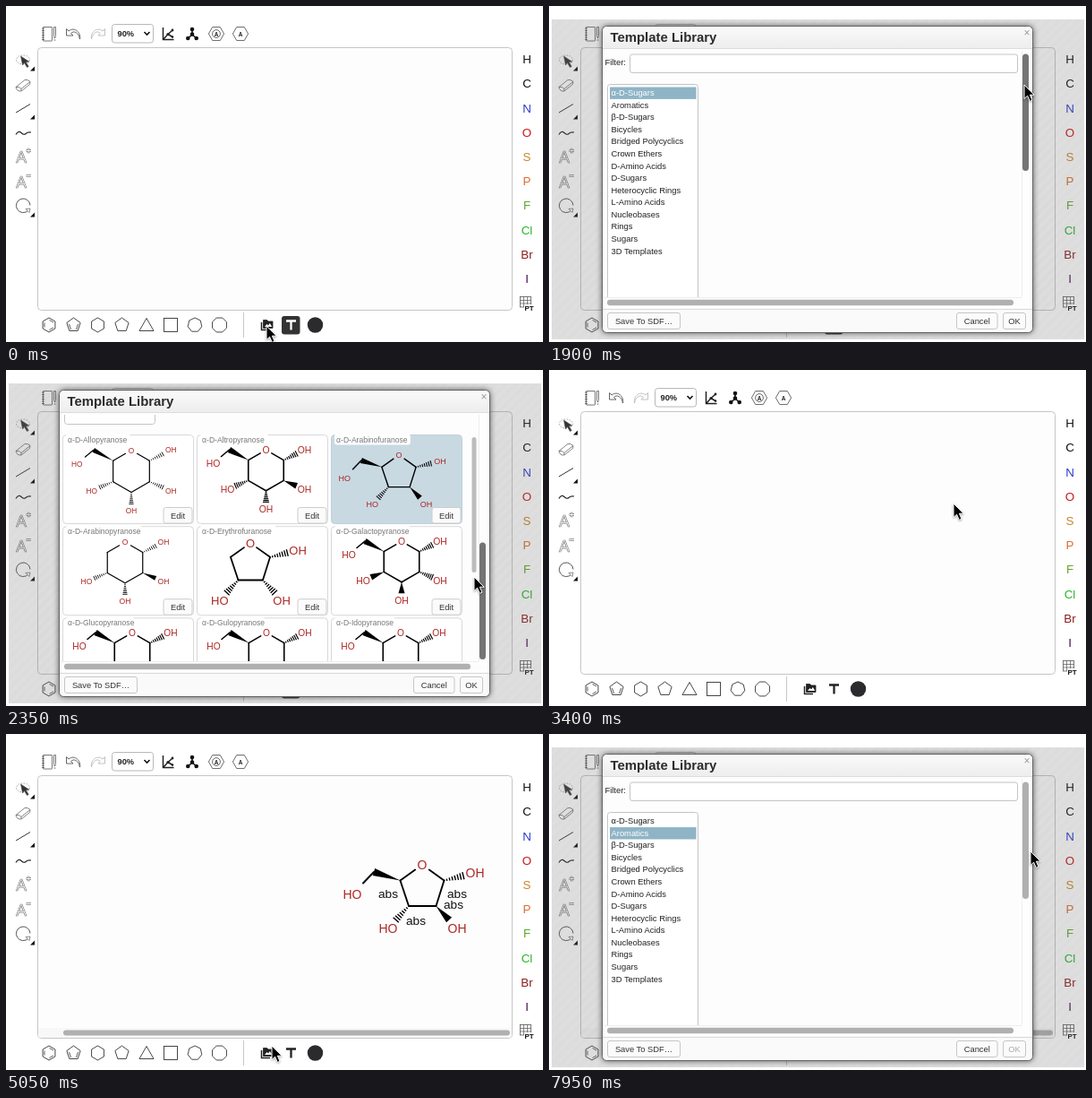
An HTML page that plays this animation: 600x375 px, repeating every 8000 ms.

```html
<!DOCTYPE html>
<html lang="en">
<head>
<meta charset="utf-8">
<title>Template library</title>
<style>
html, body { margin: 0; width: 100%; height: 100%; overflow: hidden; background: #fff; }
svg { display: block; width: 100vw; height: 100vh; font-family: "Liberation Sans", Arial, sans-serif; }
</style>
</head>
<body>
<svg id="stage" viewBox="0 0 600 375"></svg>
<script>
const LOOP = 8000;
const RED = '#ad2824', BAR = '#b0b0b0';

// --- small SVG helpers -------------------------------------------------
const text = (x, y, s, size, fill = '#333', more = '') =>
  `<text x="${x}" y="${y}" font-size="${size}" fill="${fill}" ${more}>${s}</text>`;
const mid = (x, y, s, size, fill, more = '') => text(x, y, s, size, fill, 'text-anchor="middle" ' + more);
const box = (x, y, w, h, r, fill, stroke = 'none', more = '') =>
  `<rect x="${x}" y="${y}" width="${w}" height="${h}" rx="${r}" fill="${fill}" stroke="${stroke}" ${more}/>`;
const path = (d, stroke = '#333', w = 1, fill = 'none', more = '') =>
  `<path d="${d}" fill="${fill}" stroke="${stroke}" stroke-width="${w}" ${more}/>`;
const dot = (x, y, r, fill) => `<circle cx="${x}" cy="${y}" r="${r}" fill="${fill}"/>`;
const toPath = pts => 'M' + pts.map(p => p.map(v => v.toFixed(2)).join(' ')).join('L') + 'Z';

function poly(cx, cy, r, n, turn = 0) {
  return Array.from({ length: n }, (_, i) => {
    const a = (i / n) * 2 * Math.PI - Math.PI / 2 + turn;
    return [cx + r * Math.cos(a), cy + r * Math.sin(a)];
  });
}
const lerp = (a, b, k) => [a[0] + (b[0] - a[0]) * k, a[1] + (b[1] - a[1]) * k];
function normal(a, b) {
  const dx = b[0] - a[0], dy = b[1] - a[1], l = Math.hypot(dx, dy);
  return [-dy / l, dx / l];
}
const offset = (p, n, k) => [p[0] + n[0] * k, p[1] + n[1] * k];
const line = (a, b, w, stroke = '#000') => path(`M${a}L${b}`, stroke, w, 'none', 'stroke-linecap="round"');

// --- molecules ---------------------------------------------------------
function wedge(a, b, w) {
  const n = normal(a, b);
  return path(toPath([a, offset(b, n, w), offset(b, n, -w)]), 'none', 0, '#000');
}
function hash(a, b, w, lw) {
  const n = normal(a, b);
  let out = '';
  for (let i = 1; i <= 7; i++) {
    const p = lerp(a, b, i / 7), k = w * (0.15 + 0.85 * i / 7);
    out += path(`M${offset(p, n, k)}L${offset(p, n, -k)}`, '#000', lw * 0.75);
  }
  return out;
}
const FIVE = {
  ring: [[0, -26], [24.5, -8.5], [15.5, 20], [-15, 20], [-24.5, -8.5]],
  subs: [[59, -17], [39, 45], [-38, 45]], arm: [-54, -18], end: [-78, 7]
};
const SIX = {
  ring: poly(0, 0, 22.8, 6),
  subs: [[43, -23], [43, 21], [0, 43], [-43, 21]], arm: [-41, -23], end: [-59, -8]
};
// bonds: one letter per hydroxyl (h hashed, w wedge), then c when there is a CH2OH arm
function sugar(shape, cx, cy, s, size, lw, bonds) {
  const at = p => [cx + p[0] * s, cy + p[1] * s];
  const ring = shape.ring.map(at), n = ring.length, wide = 2.2 * lw;
  const label = (p, str) => mid(p[0], p[1] + size * 0.36, str, size, RED);
  let out = '';
  ring.forEach((p, i) => {
    const q = ring[(i + 1) % n];
    out += line(i ? p : lerp(p, q, 0.32), i === n - 1 ? lerp(p, q, 0.68) : q, lw);
  });
  shape.subs.forEach((sub, i) => {
    const from = ring[i + 1], to = at(sub), end = lerp(from, to, 0.62);
    out += bonds[i] === 'w' ? wedge(from, end, wide) : hash(from, end, wide, lw);
    out += label(to, sub[0] < 0 ? 'HO' : 'OH');
  });
  if (bonds.endsWith('c')) {
    const arm = at(shape.arm), end = at(shape.end);
    out += wedge(ring[n - 1], arm, wide) + line(arm, lerp(arm, end, 0.5), lw) + label(end, 'HO');
  }
  return out + label(ring[0], 'O');
}

// --- editor ------------------------------------------------------------
function hexA(x, circled) {
  return path(toPath(poly(x, 31, 8.6, 6, Math.PI / 6)), '#444', 0.8) +
    (circled ? `<circle cx="${x}" cy="31" r="4.4" fill="none" stroke="#444" stroke-width=".8"/>` : '') +
    mid(x, 33.6, 'A', 6.5, '#222', 'font-weight="bold"');
}
function topBar() {
  let s = box(41.5, 23.5, 10, 15.5, 0.5, 'none', '#555', 'stroke-width=".8"');
  for (let y = 25; y < 39; y += 2.5) s += path(`M40 ${y}h3`, '#555', 0.8);
  s += path('M53.5 23.5h2v10l-1 2.5l-1-2.5zM53.5 38h2', '#555', 0.8);
  const undo = 'M67.5 25.5L67.5 33L75 33L72.5 30.5C76 27 81 29.5 82.5 37C84 30 77 22.5 70 28Z';
  s += path(undo, '#555', 0.9) + path(undo, '#bbb', 0.9, 'none', 'transform="translate(178,0) scale(-1,1)"');
  s += box(118.5, 20.5, 46, 20.5, 3, '#fff', '#b8b8b8') + text(124.5, 34, '90%', 9.3, '#222', 'font-weight="bold"') +
    path('M154.5 29l3 3l3-3', '#111', 1.6);
  s += path('M175.5 24v13.5h12M175.5 37.5l5.5-6l4.5-4M181 31.5l5 3', '#222', 1.5) +
    dot(181, 31.5, 1.6, '#222') + dot(186, 27, 1.4, '#222') + dot(186, 34.5, 1.3, '#222');
  s += path('M208 25.5V32L203 36M208 32L213 36', '#111', 1.6) +
    [[208, 26], [208, 31.5], [203.3, 36], [212.7, 36]].map(p => dot(...p, 2.3, '#111')).join('');
  return s + hexA(235, true) + hexA(262, false);
}
function leftBar() {
  const corner = y => path(`M32 ${y}v5h-5z`, 'none', 0, '#111');
  const bigA = (y, sign) => {
    const d = `M22.5 ${y - 6.5}h5.5` + (sign ? 'm-2.75-2.75v5.5' : '');
    return mid(17, y + 6.5, 'A', 17.5, 'none', 'stroke="#777" stroke-width=".7"') + path(d, '#777', 2.4) + path(d, '#fff', 0.9);
  };
  return `<ellipse cx="19" cy="60" rx="7.5" ry="5" fill="none" stroke="#888" stroke-width=".8" stroke-dasharray="1.5 1.5"/>` +
    path('M16.5 56l2 10l2-2.5l3 5l1.8-1l-2.9-4.8l3.4-.6z', '#555', 0.6, '#333') +
    path('M11 90.5L21 82.5Q24 81.5 27 84.5L26.5 87.5L17 95Q12 95.5 11 90.5ZM11 90.5Q15 89.5 17 92.5V95M17 92.5L27 84.5', '#666', 0.8) +
    path('M11 119L27 109.5', '#333', 1) +
    path('M11 143.5Q14 138.5 17 141.5T22 142.5T28 141', '#222', 1.1) +
    bigA(168, true) + bigA(196, false) +
    path('M25 228A7.8 7.8 0 1 1 27 222.5', '#444', 0.9) + path('M22 226.5l5-.5l-1 4.5z', '#444', 0.6, '#fff') +
    corner(67.5) + corner(121.5) + corner(230.5);
}
function rightBar() {
  const atoms = ['H #111', 'C #111', 'N #2a3ccf', 'O #c81818', 'S #c8862a', 'P #dd6d2c', 'F #62a82c', 'Cl #28b428', 'Br #8c1c1c', 'I #471050'];
  let s = atoms.map((a, i) => {
    const [name, fill] = a.split(' ');
    return mid(582, 64.2 + i * 27.2, name, 13.4, fill);
  }).join('');
  s += box(574.5, 324.5, 12, 11.5, 0, 'none', '#555', 'stroke-width=".8"') +
    path('M574.5 328.5h12M574.5 332h12M578.5 324.5v11.5M582.5 324.5v11.5', '#555', 0.7);
  return s + box(579, 333, 11, 8, 0, '#fff') + text(579.5, 339.8, 'PT', 8, '#111', 'font-weight="bold"');
}
function bottomBar() {
  const ring = (x, n, turn = 0, r = 8) => path(toPath(poly(x, 356, r, n, turn)), '#333', 0.9);
  const letterT = fill => path('M313 351.5h11M318.5 351v10.5', fill, 2.3);
  const s = ring(48, 6) + path('M43 353.5v5M48.5 350.5l4.5 2.6M48.5 361.5l4.5-2.6', '#333', 0.8) +
    ring(75.5, 5) + path('M70.5 355l2 6M80.5 355l-2 6', '#333', 0.8) +
    ring(102.5, 6) + ring(129.5, 5) +
    path('M157 348.5l8 14h-16z', '#333', 0.9) + box(176.5, 348.5, 15, 15, 0, 'none', '#333', 'stroke-width=".9"') +
    ring(211, 7) + ring(238.5, 8, Math.PI / 8, 8.6) + path('M265.5 342v28', '#c8c8c8', 1) +
    path('M285.5 353v8.5h9.5', '#222', 1.5) + path('M287.5 350.5h4l1.5 1.5h5v7.5h-10.5z', '#222', 0.8, '#222') +
    path('M289 358l2.5-3l1.5 1.5l1.8-2.5l2.4 4z', 'none', 0, '#fff');
  return s + `<g id="tPlain">${letterT('#222')}</g>` +
    `<g id="tHover">${box(308, 346, 20.5, 20.5, 3, '#333')}${letterT('#fff')}</g>` + dot(345.5, 356, 8.7, '#2b2b2e');
}
function sketch() {
  const abs = [[427, 182.5], [504, 182.5], [500, 195], [458, 213]].map(p => mid(...p, 'abs', 13.7, '#111')).join('');
  return `<g id="mol">${sugar(FIVE, 465, 172, 1, 14, 1.9, 'hwhc')}</g><g id="placed">${abs}` +
    box(36, 328, 529, 11, 3, '#f8f8f8') + box(64, 330.5, 499, 6, 3, BAR) + '</g>';
}

// --- dialog ------------------------------------------------------------
const GROUPS = ['α-D-Sugars', 'Aromatics', 'β-D-Sugars', 'Bicycles', 'Bridged Polycyclics', 'Crown Ethers', 'D-Amino Acids',
  'D-Sugars', 'Heterocyclic Rings', 'L-Amino Acids', 'Nucleobases', 'Rings', 'Sugars', '3D Templates'];
const ROW = 13.58, LIST_TOP = 90.5, SCROLL_MAX = 291, THUMB_MAX = 139;

function card(i, name, drawing) {
  const x = 63.5 + (i % 3) * 150, y = 72.5 + Math.floor(i / 3) * 102.2, picked = i === 2;
  return box(x, y, 146, 99, 4, picked ? '#c8d9e2' : '#fff', picked ? '#c0d0d9' : '#d8d8d8') +
    box(x + 3.5, y - 1, (name.length + 4) * 4.2 + 5, 12, 3, '#fff') +
    text(x + 5.6, y + 8, 'α-D-' + name, 8.55, '#777') + drawing +
    box(x + 112.5, y + 81, 32, 17.5, 2.5, '#fbfbfb', '#ccc') + mid(x + 128.5, y + 93.3, 'Edit', 9.35);
}
function cards() {
  const six = (x, y, size, bonds, lw = 1.6) => sugar(SIX, x, y, 1, size, lw, bonds);
  const items = [
    ['Allopyranose', sugar(SIX, 140, 113, 1.03, 8.3, 1.2, 'hhhhc')],
    ['Altropyranose', six(290.5, 112, 10.4, 'hwhhc')],
    ['Arabinofuranose', sugar(FIVE, 439, 115, 0.78, 9, 1.45, 'hwhc')],
    ['Arabinopyranose', six(133, 215, 8.6, 'hwhh', 1.2)],
    ['Erythrofuranose', sugar(FIVE, 273, 216.5, 0.9, 13, 1.8, 'hhh')],
    ['Galactopyranose', six(442, 214, 10.4, 'hhwwc')],
    ['Glucopyranose', six(141, 316, 10.2, 'hhwhc')],
    ['Gulopyranose', six(291, 316, 10.2, 'hhhwc')],
    ['Idopyranose', six(441, 316, 10.2, 'hwhhc')]
  ];
  return items.map(([name, d], i) => card(i, name, d)).join('');
}
function dialog() {
  const button = (x, w, label, id = '') => box(x, 342.5, w, 18, 2.5, '#fbfbfb', '#c6c6c6') +
    mid(x + w / 2, 355, label, 9.35, '#333', id);
  const list = box(65.5, 87.5, 101, 264, 3, '#fff', '#c4c4c4') +
    box(68, 0, 96.5, 13.4, 0, '#eeeeee', 'none', 'id="hover"') + box(68, 0, 96.5, 13.4, 0, '#8fb4c6', 'none', 'id="picked"') +
    GROUPS.map((g, i) => text(69.5, (LIST_TOP + 9.6 + i * ROW).toFixed(2), g, 9.4, '#222', 'class="group"')).join('');
  return `<g style="filter:drop-shadow(0 0 3px rgba(0,0,0,.6))">${box(59.5, 22.5, 481, 342, 5, '#fafafa', '#666')}</g>` +
    box(60.5, 23.5, 479, 24, 4, 'url(#bar)') + path('M60 47.5h480', '#ddd') +
    text(68.5, 40.2, 'Template Library', 14.9, '#2b2b2b', 'font-weight="bold"') + mid(534, 34, '×', 12, '#999') +
    box(61, 48, 478, 290, 0, '#fdfdfd') +
    `<g clip-path="url(#view)"><g id="content">` +
    text(62.5, 66, 'Filter:', 9.35, '#222') + box(90.5, 54, 433, 20.5, 2.5, '#fff', '#c4c4c4') + list +
    `<g id="cards" transform="translate(0,${SCROLL_MAX})">${cards()}${box(520.5, 75, 5, 151, 2.5, '#bcbcbc')}</g></g></g>` +
    path('M61 325.5h467M528.5 50v275', '#eeeeee') +
    box(529, 53.5, 7, 130.5, 3.5, BAR, 'none', 'id="thumb"') + box(65, 327.7, 454, 6.5, 3.2, BAR) +
    path('M60 338.5h480', '#d8d8d8') + button(65.5, 81, 'Save To SDF…') + button(455.5, 45.5, 'Cancel') +
    button(507.5, 25, 'OK', 'id="ok"');
}

// --- assemble ----------------------------------------------------------
document.getElementById('stage').innerHTML = `<defs>
  <linearGradient id="bar" x2="0" y2="1"><stop stop-color="#fafafa"/><stop offset="1" stop-color="#ededed"/></linearGradient>
  <clipPath id="view"><rect x="61" y="50" width="467" height="275"/></clipPath>
  <pattern id="stripes" width="8" height="8" patternUnits="userSpaceOnUse" patternTransform="rotate(45)">
    <rect width="8" height="8" fill="#666"/><rect width="4" height="8" fill="#707070"/></pattern></defs>` +
  box(0, 0, 600, 375, 0, '#fff') + box(35.5, 46.5, 530, 293, 4, '#fdfdfd', '#c6c6c6') +
  topBar() + leftBar() + rightBar() + bottomBar() + sketch() +
  `<g id="dialog">${box(3, 15, 595, 357, 0, 'url(#stripes)', 'none', 'opacity=".23"')}${dialog()}</g>` +
  `<g id="cursor" style="filter:drop-shadow(0 1px 1px rgba(0,0,0,.35))">` +
  path('M0 0V15.5L3.6 12.2L6.3 18.4L9 17.2L6.4 11.2H11.2Z', '#fff', 1, '#000') + '</g>';

const $ = id => document.getElementById(id);
const groups = [...document.querySelectorAll('.group')];
const show = (id, on) => $(id).setAttribute('display', on ? 'inline' : 'none');

// --- motion ------------------------------------------------------------
// time, x, y of the pointer tip
const TRACK = [
  [0, 291, 357], [250, 291, 357], [850, 190, 180], [1100, 120, 100], [1250, 120, 99], [1800, 531, 87], [1900, 531, 88],
  [2300, 523, 231], [2380, 523, 231], [2600, 440, 135], [2680, 440, 135], [2900, 518, 351], [3000, 518, 351],
  [3400, 452, 149], [3500, 452, 149], [3800, 456, 181], [4300, 456, 181], [5000, 297, 348], [5100, 297, 348],
  [5250, 291, 356], [5650, 291, 356], [6200, 133, 159], [6500, 112, 108], [6900, 112, 109], [7900, 538, 131], [8000, 538, 131]
];
const ease = k => k * k * (3 - 2 * k);
function pointer(t) {
  const i = Math.max(1, TRACK.findIndex(p => t < p[0]));
  const [t0, ...a] = TRACK[i - 1], [t1, ...b] = TRACK[i];
  return lerp(a, b, ease((t - t0) / (t1 - t0)));
}
const PLACED = [456, 181];

function draw(t) {
  const [x, y] = pointer(t);
  $('cursor').setAttribute('transform', `translate(${x},${y})`);

  const first = t >= 100 && t < 3000, second = t >= 5650;
  show('dialog', first || second);
  show('tHover', t < 3000);
  show('tPlain', t >= 3000);

  const placed = t >= 3800;
  show('mol', t >= 3500);
  show('placed', placed);
  $('mol').setAttribute('transform', placed ? '' : `translate(${x - PLACED[0]},${y - PLACED[1]})`);

  const dragging = t >= 1850 && t < 2400;
  const moved = !first || t < 1900 ? 0 : t < 2300 ? Math.min(THUMB_MAX, Math.max(0, y - 88)) : THUMB_MAX;
  const onThumb = x >= 528.5 && x <= 536.5 && y >= 53 + moved && y <= 184 + moved;
  $('thumb').setAttribute('y', 53.5 + moved);
  $('thumb').setAttribute('fill', dragging || onThumb ? '#747474' : BAR);
  $('content').setAttribute('transform', `translate(0,${-moved / THUMB_MAX * SCROLL_MAX})`);

  const picked = t >= 6600 ? 1 : 0;
  const row = Math.floor((y - LIST_TOP) / ROW);
  const over = !moved && x > 67 && x < 165 && row >= 0 && row < GROUPS.length && row !== picked;
  show('hover', over && (first || second));
  $('hover').setAttribute('y', LIST_TOP + row * ROW);
  $('picked').setAttribute('y', LIST_TOP + picked * ROW);
  groups.forEach((g, i) => g.setAttribute('fill', i === picked ? '#fff' : '#222'));
  show('cards', !picked);
  $('ok').setAttribute('fill', picked ? '#aaa' : '#333');
}
const start = performance.now();
function tick() {
  draw((performance.now() - start) % LOOP);
  requestAnimationFrame(tick);
}
tick();
</script>
</body>
</html>
```
